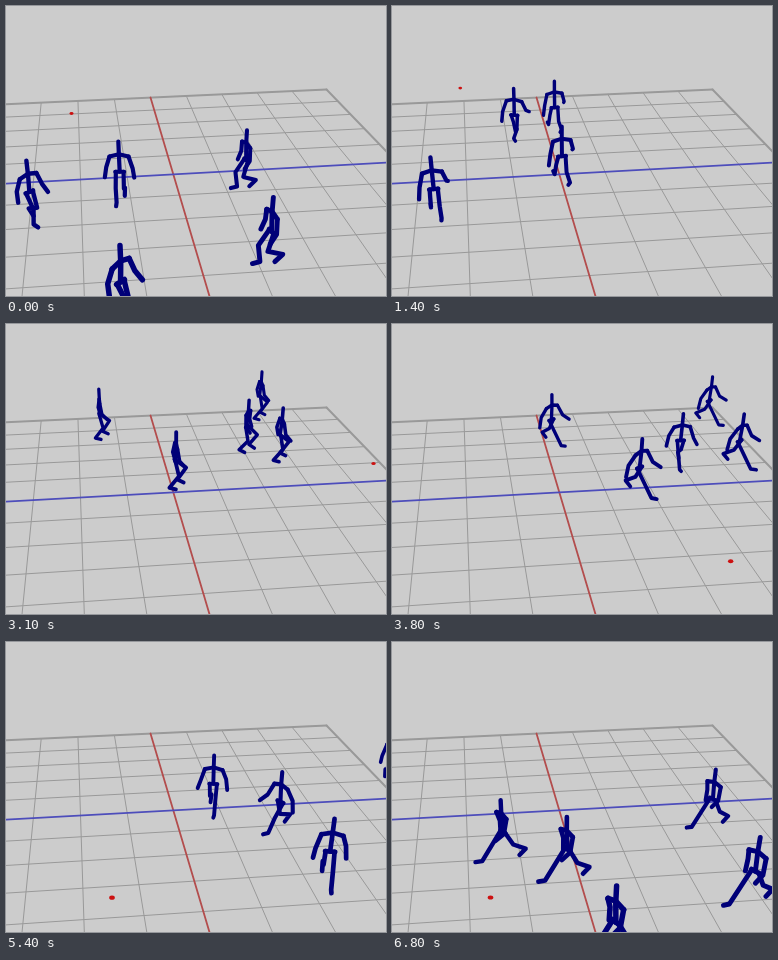
An HTML page with a canvas that plays this animation: 380x290 px, repeating every 6900 ms.

```html
<!DOCTYPE html>
<html lang="en">
<head>
<meta charset="utf-8">
<title>Walkers</title>
<style>
html, body { margin: 0; width: 100%; height: 100%; overflow: hidden; background: #ccc; }
canvas { display: block; }
</style>
</head>
<body>
<canvas id="stage" width="380" height="290"></canvas>
<script>
const ctx = document.getElementById('stage').getContext('2d');
const LOOP = 6900;
const STEP = 500; // ms per footstep
const UNIT = 46;  // body pixels per floor unit
const NAVY = '#000078';

// The group circles the floor: time and floor position at a few turning points.
const ROUTE = [
  { t: -800, x: -2, z: 3.2 }, { t: 0, x: -2.93, z: 1.8 }, { t: 800, x: -3.81, z: 0 },
  { t: 2000, x: -3.93, z: -2.88 }, { t: 3100, x: -1.44, z: -3.37 },
  { t: 3800, x: .18, z: -2.97 }, { t: 5400, x: .84, z: .1 },
  { t: 6800, x: -1.31, z: 2 }, { t: 7400, x: -2.7, z: 1.9 }
];

// Place in the group and the direction faced at the start.
const WALKERS = [
  { offset: () => [0, 0], facing: .9 },
  { offset: orbit, facing: 1.7 },
  { offset: () => [4.3, -.9], facing: 2.9 },
  { offset: () => [4.1, 2], facing: 2.9 },
  { offset: () => [1.5, 3.2], facing: .8 }
];

// The marker glides to each spot in turn.
const HOPS = [
  { t: 0, x: 69, y: 70, ease: 1200 },
  { t: 1480, x: 367, y: 139, ease: 120 },
  { t: 3300, x: 331, y: 261, ease: 310 },
  { t: 4850, x: 98, y: 255, ease: 160 }
];

const lerp = (a, b, u) => a + (b - a) * u;
const unit = ([x, z]) => {
  const d = Math.hypot(x, z) || 1;
  return [x / d, z / d];
};

// Uneven playback: one long pause, then regularly dropped ticks.
function heldTime(t) {
  let tick = Math.floor(t / 100);
  if (tick > 24 && tick < 31) tick = 24;
  const beat = (tick - 1) % 7;
  if (tick > 33 && (beat === 0 || beat === 3)) tick--;
  return tick * 100;
}

function orbit(t) {
  const angle = Math.min(165, -120 + .051 * t) * Math.PI / 180;
  return [2.4 + 1.35 * Math.cos(angle), .5 + 1.35 * Math.sin(angle)];
}

const depth = (x, z, h = 0) => 1 + .0055 * x - .0559 * z - .00081 * h;

function project(x, z, h = 0) {
  const w = depth(x, z, h);
  return [
    (46.8 * x - 3.49 * z + 166.8 - .134 * h) / w,
    (-1.61 * x + 10.27 * z + 167.8 - 1.134 * h) / w
  ];
}

function stroke(points, color, width) {
  ctx.strokeStyle = color;
  ctx.lineWidth = width;
  ctx.beginPath();
  points.forEach(p => ctx.lineTo(...p));
  ctx.stroke();
}

function drawGrid() {
  const along = (i, color, width) => stroke([project(i, -5), project(i, 5)], color, width);
  const across = (i, color, width) => stroke([project(-5, i), project(5, i)], color, width);
  for (let i = -5; i <= 5; i++) {
    if (i === 0) continue;
    const width = Math.abs(i) === 5 ? 2 : 1;
    along(i, '#999', width);
    across(i, '#999', width);
  }
  along(0, '#b34d4d', 1.8);
  across(0, '#4d4dbb', 1.8);
}

// Cubic Hermite curve through the route.
function groupPlace(t) {
  let i = 1;
  while (i < ROUTE.length - 3 && t >= ROUTE[i + 1].t) i++;
  const [before, from, to, after] = ROUTE.slice(i - 1, i + 3);
  const span = to.t - from.t, u = (t - from.t) / span;
  return ['x', 'z'].map(axis => {
    const p = from[axis], q = to[axis];
    const m = (q - before[axis]) / (to.t - before.t) * span;
    const n = (after[axis] - p) / (after.t - from.t) * span;
    return p + u * (m + u * (3 * (q - p) - 2 * m - n + u * (2 * (p - q) + m + n)));
  });
}

function place(walker, t) {
  const [x, z] = groupPlace(t), [dx, dz] = walker.offset(t);
  return [x + dx, z + dz];
}

function heading(walker, t) {
  const [x0, z0] = place(walker, t - 50), [x1, z1] = place(walker, t + 50);
  const [gx, gz] = unit([x1 - x0, z1 - z0]);
  const turned = Math.min(1, t / 400);
  return unit([
    lerp(Math.cos(walker.facing), gx, turned),
    lerp(Math.sin(walker.facing), gz, turned)
  ]);
}

// Knee of a two-part leg, bending forward.
function kneeAt(hip, foot, heel) {
  const drop = heel - hip, length = Math.hypot(foot, drop);
  const bend = Math.sqrt(Math.max(0, 14.4 ** 2 - length ** 2 / 4));
  return [foot / 2 - drop / length * bend, hip + drop / 2 + foot / length * bend];
}

function drawWalker(walker, t) {
  const [x, z] = place(walker, t);
  const [fx, fz] = heading(walker, t);
  const phase = Math.PI * ((t - 800) / STEP + .5);
  const width = 3.9 / depth(x, z);

  // f: forward, s: sideways, h: height
  const at = ([f, s, h]) => project(
    x + (fx * f - fz * s) / UNIT, z + (fz * f + fx * s) / UNIT, h);
  const bone = (...points) => stroke(points.map(at), NAVY, width);

  const hip = 28 - 3.5 * Math.sin(phase) ** 2;
  const shoulder = hip + 15;
  bone([0, 0, hip], [1, 0, shoulder], [1, 0, hip + 27]);
  bone([1, -8.5, shoulder - 1], [1, 0, shoulder + 1], [1, 8.5, shoulder - 1]);
  bone([0, -4, hip], [0, 4, hip]);

  for (const side of [-1, 1]) {
    const turn = phase + (side > 0 ? 0 : Math.PI);
    const swing = Math.sin(turn);
    const lift = Math.max(0, Math.cos(turn)) * 6;
    const foot = 20 * swing - lift * .6;
    const heel = 2 + lift + Math.max(0, -swing) * 3;
    const leg = side * 3.5;
    const [kneeF, kneeH] = kneeAt(hip, foot, heel);
    bone([0, leg, hip], [kneeF, leg, kneeH], [foot, leg, heel],
      [foot + 6.5, leg, 1 + lift * .5 + Math.max(0, swing) * 2]);

    const reach = -swing;
    const elbow = 1 + 5 * reach, elbowH = shoulder - 11;
    bone([1, side * 8.5, shoulder - 1], [elbow, side * 12, elbowH],
      [elbow + 4 + 5 * reach, side * 13.5, elbowH - 7 + 4 * reach]);
  }
}

function drawMarker(t) {
  let x = 65, y = 107;
  for (const hop of HOPS) {
    const u = 1 - Math.exp(-Math.max(0, t - hop.t) / hop.ease);
    x = lerp(x, hop.x, u);
    y = lerp(y, hop.y, u);
  }
  ctx.fillStyle = '#cc1111';
  ctx.beginPath();
  ctx.ellipse(x, y, 1.4 + y / 180, 1 + y / 230, 0, 0, 2 * Math.PI);
  ctx.fill();
}

function draw(t) {
  ctx.setTransform(1, 0, 0, 1, 0, 0);
  ctx.fillStyle = '#ccc';
  ctx.fillRect(0, 0, 380, 290);
  ctx.translate(.5, .5);
  ctx.lineCap = ctx.lineJoin = 'round';
  drawGrid();
  drawMarker(t);
  [...WALKERS]
    .sort((a, b) => place(a, t)[1] - place(b, t)[1])
    .forEach(walker => drawWalker(walker, t));
}

let began;
function tick(now) {
  began ??= now;
  draw(heldTime((now - began) % LOOP));
  requestAnimationFrame(tick);
}
draw(0);
requestAnimationFrame(tick);
</script>
</body>
</html>
```
